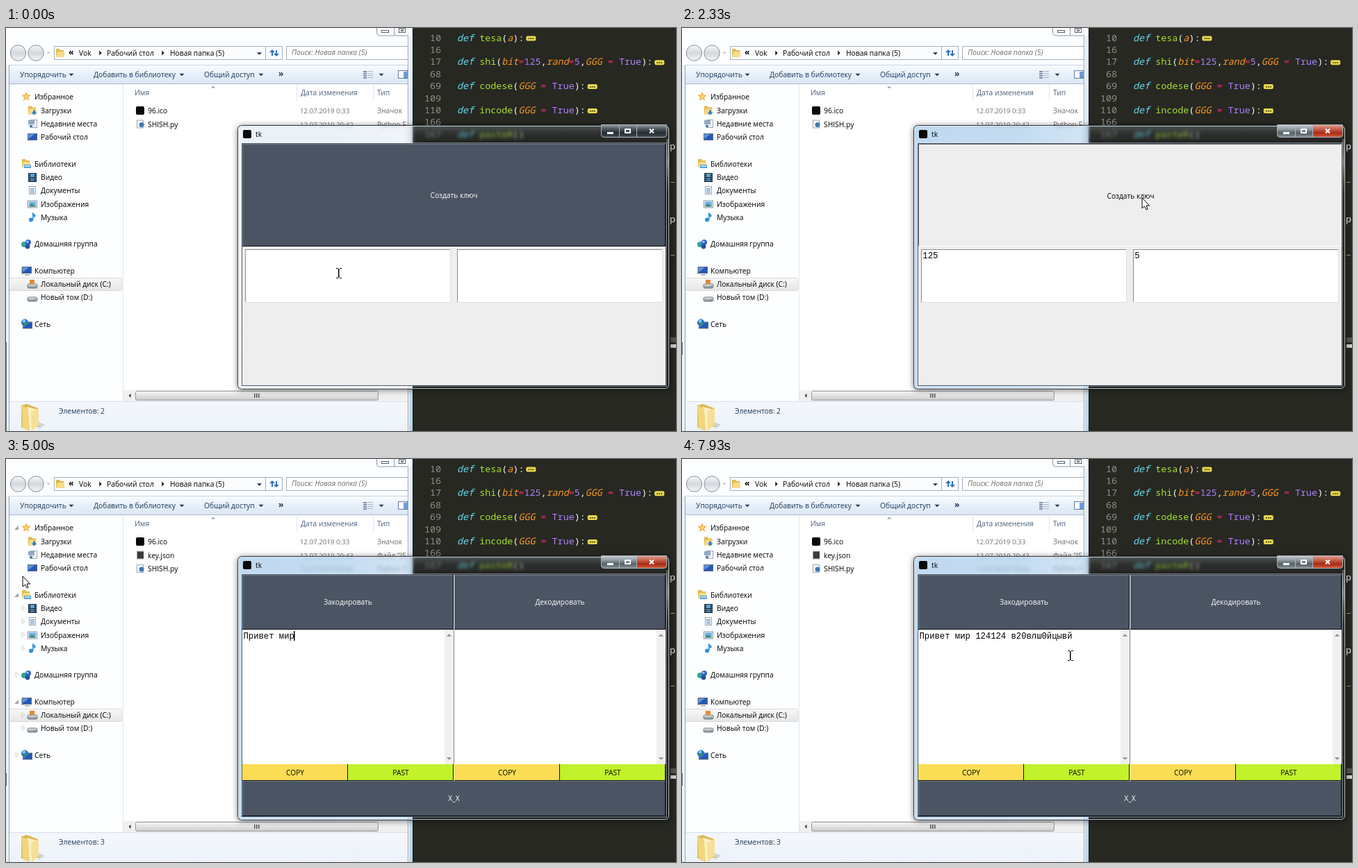
An HTML page with a canvas for the animation above (8 s loop, 964x581 px).

```html
<!DOCTYPE html>
<html lang="ru">
<head>
<meta charset="utf-8">
<style>
html, body { margin: 0; width: 100%; height: 100%; overflow: hidden; background: #272822; }
canvas { display: block; }
</style>
</head>
<body>
<canvas id="stage" width="964" height="581"></canvas>
<script>
const canvas = document.getElementById('stage');
const g = canvas.getContext('2d');
const LOOP = 8000;
const UI = '"Open Sans", "Noto Sans", sans-serif';
const MONO = '"Liberation Mono", monospace';
const CODE = '"Noto Sans Mono", "DejaVu Sans Mono", monospace';
const NAVY = '#1e395b', SLATE = '#4b5463';

// ---------- helpers ----------
function box(color, x, y, w, h) { g.fillStyle = color; g.fillRect(x, y, w, h); }
function frame(color, x, y, w, h) { g.strokeStyle = color; g.lineWidth = 1; g.strokeRect(x + .5, y + .5, w - 1, h - 1); }
function text(s, x, y, color = '#000', font = '10.3px ' + UI, align = 'left') {
  g.font = font; g.fillStyle = color; g.textAlign = align; g.fillText(s, x, y);
}
function poly(color, ...p) {
  g.beginPath();
  for (let i = 0; i < p.length; i += 2) g.lineTo(p[i], p[i + 1]);
  g.closePath(); g.fillStyle = color; g.fill();
}
function disc(color, x, y, r) { g.beginPath(); g.arc(x, y, r, 0, 7); g.fillStyle = color; g.fill(); }
function round(x, y, w, h, r) { g.beginPath(); g.roundRect(x, y, w, h, r); }
function shade(y0, y1, ...colors) {
  const s = g.createLinearGradient(0, y0, 0, y1);
  colors.forEach((c, i) => s.addColorStop(i / (colors.length - 1), c));
  return s;
}
function down(x, y, color = NAVY, r = 3.5) { poly(color, x - r, y - r / 2, x + r, y - r / 2, x, y + r / 2); }
function up(x, y, color, r = 3.5) { poly(color, x - r, y + r / 2, x + r, y + r / 2, x, y - r / 2); }
function right(x, y, color, r = 3.5) { poly(color, x - r / 2, y - r, x - r / 2, y + r, x + r / 2, y); }

// ---------- icons, centred on x, y ----------
function page(x, y) { box('#fdfdfd', x - 4, y - 6, 9, 12); frame('#9aa4b0', x - 5, y - 6, 10, 12); }
function folder(x, y) {
  poly('#e3b94f', x - 6, y - 6, x - 1, y - 6, x, y - 4, x + 5, y - 4, x + 5, y + 6, x - 6, y + 6);
  poly('#f8dd86', x - 4, y - 2, x + 6, y - 2, x + 6, y + 6, x - 6, y + 6);
}
function screen(x, y) {
  box('#5b6b80', x - 7, y - 5, 14, 10); box('#2458b8', x - 6, y - 4, 12, 8); poly('#5f94e0', x - 6, y - 4, x + 3, y - 4, x - 6, y + 3);
}
function drive(x, y) {
  round(x - 7, y - 1, 14, 6, 2); g.fillStyle = shade(y - 1, y + 5, '#eceff1', '#7d858c'); g.fill();
  g.strokeStyle = '#737b82'; g.stroke(); box('#38b24a', x + 3, y + 2, 2, 1);
}
function globe(x, y) { disc('#2a6fc4', x, y, 5); disc('#7cc7ee', x - 1, y - 2, 2.4); disc('#3a9a54', x + 1, y + 2, 2); }
const icon = {
  star(x, y) {
    const p = [];
    for (let i = 0; i < 10; i++) {
      const a = i * Math.PI / 5, r = i % 2 ? 3 : 7;
      p.push(x + r * Math.sin(a), y - r * Math.cos(a));
    }
    poly('#f0a83c', ...p); disc('#fbd96b', x, y, 2.6);
  },
  load(x, y) { folder(x, y); box('#2a7fd8', x + 1, y, 3, 4); down(x + 2.5, y + 5, '#2a7fd8', 4); },
  recent(x, y) { page(x + 2, y); box('#8fa9c4', x - 6, y - 5, 9, 6); box('#c9d8e6', x, y + 2, 5, 1); box('#4f7daa', x - 4, y + 2, 4, 3); },
  desk: screen,
  libs(x, y) { folder(x, y - 1); box('#5aa0dd', x - 3, y + 1, 10, 5); box('#b7dbf5', x - 2, y + 2, 8, 2); },
  video(x, y) {
    box('#1d2d3a', x - 6, y - 6, 12, 13); box('#59a5d8', x - 3, y - 5, 6, 5); box('#3f79a8', x - 3, y + 1, 6, 5);
    for (let i = -5; i < 7; i += 3) { box('#dfe8ee', x - 5, y + i, 1, 1); box('#dfe8ee', x + 4, y + i, 1, 1); }
  },
  doc(x, y) { page(x, y); for (let i = -3; i < 5; i += 2) box('#5b8fc4', x - 3, y + i, 6, 1); },
  image(x, y) { box('#f5f8fa', x - 7, y - 5, 14, 11); frame('#8796a4', x - 7, y - 5, 14, 11); box('#64b1ea', x - 5, y - 3, 10, 7); poly('#3a8a66', x - 5, y + 4, x - 1, y, x + 5, y + 4); },
  music(x, y) { disc('#2f8fd8', x - 2, y + 4, 3); box('#2f8fd8', x, y - 6, 1.6, 10); poly('#2f8fd8', x, y - 7, x + 5, y - 2, x + 3, y + 1, x + 1, y - 3); },
  group(x, y) { disc('#2fa39a', x - 3, y + 1, 4); disc('#3a62c8', x + 3, y - 2, 4); disc('#2c4f9e', x + 2, y + 4, 3.4); disc('#a9d7f4', x + 2, y - 3, 1.6); },
  pc(x, y) { box('#b7c1cb', x - 7, y - 5, 3, 10); screen(x + 1, y - 1); box('#9aa6b2', x - 2, y + 5, 7, 1.5); },
  disk(x, y) { drive(x, y + 1); box('#e08a38', x - 4, y - 6, 7, 6); },
  vol: (x, y) => drive(x, y + 1),
  net(x, y) { screen(x + 2, y + 2); globe(x - 2, y - 2); }
};

// ---------- file manager ----------
const tree = [
  [0, 99, 'star', 'Избранное'], [1, 118.5, 'load', 'Загрузки'], [1, 138, 'recent', 'Недавние места'],
  [1, 157, 'desk', 'Рабочий стол'], [0, 196, 'libs', 'Библиотеки'], [1, 215, 'video', 'Видео'],
  [1, 234, 'doc', 'Документы'], [1, 253.5, 'image', 'Изображения'], [1, 272.5, 'music', 'Музыка'],
  [0, 311, 'group', 'Домашняя группа'], [0, 350, 'pc', 'Компьютер'], [1, 369, 'disk', 'Локальный диск (C:)'],
  [1, 388, 'vol', 'Новый том (D:)'], [0, 426.5, 'net', 'Сеть']
];

function expander(deep, y, kind) {
  if (!deep && kind !== 'group' && kind !== 'net') return poly('#7c7c7c', 18, y - 3, 18, y + 3, 12, y + 3);
  const x = deep ? 25 : 16;
  g.beginPath(); g.moveTo(x - 2, y - 3.5); g.lineTo(x + 2, y); g.lineTo(x - 2, y + 3.5); g.closePath();
  g.strokeStyle = '#c0c0c0'; g.stroke();
}

function navTree(alpha) {
  round(4.5, 360.5, 162, 18, 2);
  g.fillStyle = shade(360, 378, '#f9f9f9', '#e6e6e6'); g.fill(); g.strokeStyle = '#d8d8d8'; g.stroke();
  for (const [deep, y, kind, label] of tree) {
    icon[kind](deep ? 38 : 29, y);
    text(label, deep ? 50 : 41, y + 4);
    const link = deep && y < 180;
    g.globalAlpha = link ? 0 : alpha;
    expander(deep, y, kind);
    g.globalAlpha = 1;
  }
}

function fileRow(y, kind, name, date, type) {
  if (kind === 'app') { round(187, y - 6, 12, 12, 2); g.fillStyle = '#0a0a0a'; g.fill(); }
  else {
    page(193, y);
    if (kind === 'py') disc('#3c78b4', 195, y + 1, 3.5); else box('#3b3a33', 189, y - 5, 9, 10);
  }
  text(name, 204, y + 4);
  text(date, 423, y + 4, '#6d6d6d', '9.7px ' + UI);
  text(type, 534, y + 4, '#6d6d6d');
}

function explorer(t) {
  box('#eaf3fa', 0, 0, 585, 581);
  box('#fdfeff', 0, 0, 578, 54);
  box(shade(0, 581, '#e6f1f9', '#cfe1ef', '#bcd6ea'), 579, 0, 6, 581);
  box('#fff', 579, 12, 1, 569);
  box('#5d6b77', 0, 453, 1, t < 1800 ? 128 : 18);

  // caption buttons
  round(533.5, -5, 60, 16, 4); g.strokeStyle = '#8b9aa8'; g.lineWidth = 1; g.stroke();
  box('#fbfdff', 579, 0, 5, 12); box('#8b9aa8', 558, 0, 1, 11);
  frame('#56616c', 540, 3, 11, 4); frame('#56616c', 565, 0, 10, 7); frame('#56616c', 568, 2, 4, 3);

  // history buttons
  for (const x of [17.5, 43]) {
    disc(shade(24, 48, '#fafbfc', '#d3d8dd', '#f6f8f9'), x, 36, 11);
    g.strokeStyle = '#828c95'; g.lineWidth = 1; g.beginPath(); g.arc(x, 36, 11.2, 0, 7); g.stroke();
  }
  down(61, 36, '#c2c8ce', 3);

  // address and search
  box('#fbfcfd', 69, 26, 329, 20); frame('#a3b0bd', 69, 26, 305, 20); frame('#a3b0bd', 373, 26, 25, 20);
  box('#fff', 403, 26, 175, 20); box('#a3b0bd', 403, 26, 175, 1); box('#a3b0bd', 403, 45, 175, 1); box('#a3b0bd', 403, 26, 1, 20);
  folder(78, 36);
  text('«', 90, 39, '#000', 'bold 12px ' + UI);
  text('Vok', 105, 40); text('Рабочий стол', 145, 40); text('Новая папка (5)', 236, 40);
  right(136, 36, '#222'); right(226, 36, '#222'); down(364.5, 37, '#26304d');
  box('#2f6fc0', 382, 33, 2, 7); up(383, 33, '#2f6fc0', 4);
  box('#2f6fc0', 388, 32, 2, 7); down(389, 39, '#2f6fc0', 4);
  text('Поиск: Новая папка (5)', 411, 39, '#6d6d6d', 'italic 10.3px ' + UI);

  // toolbar
  box(shade(54, 80, '#fafcff', '#e6eff9', '#dce7f4'), 4, 54, 574, 27);
  box('#c5d3e3', 4, 53, 574, 1); box('#a9bbd0', 4, 80, 574, 1);
  text('Упорядочить', 20, 71, NAVY); text('Добавить в библиотеку', 126, 71, NAVY); text('Общий доступ', 285, 71, NAVY);
  text('»', 392, 70, NAVY, 'bold 12px ' + UI);
  for (const x of [94, 253, 367, 540]) down(x, 67.5);
  for (let i = 0; i < 4; i++) { box('#7c8ea6', 514, 62 + i * 3, 5, 2); box('#a8b6c8', 520, 62 + i * 3, 8, 1); }
  box('#fff', 564, 61, 14, 12); frame('#5f7da3', 564, 61, 14, 12); box('#6a9bd8', 572, 63, 6, 9);

  // panes
  box('#fff', 4, 81, 574, 458); box('#fcfeff', 4, 81, 164, 458); box('#dbe7f3', 168, 81, 1, 458);
  text('Имя', 185, 97, '#4c607a'); text('Дата изменения', 424, 97, '#4c607a'); text('Тип', 534, 97, '#4c607a');
  box('#dfe7f0', 418, 82, 1, 23); box('#dfe7f0', 528, 82, 1, 23); up(298, 85, '#8ba0b8', 3);
  navTree(treeAlpha(t));
  const saved = t >= 3330;
  fileRow(119, 'app', '96.ico', '12.07.2019 0:33', 'Значок');
  if (saved) fileRow(138.5, 'json', 'key.json', '12.07.2019 20:43', 'Файл "JS');
  fileRow(saved ? 158 : 138.5, 'py', 'SHISH.py', '12.07.2019 20:42', 'Python F');

  // scrollbar
  box('#f0f0f0', 169, 522, 409, 16);
  g.save(); g.translate(178, 530); g.scale(-1, 1); right(0, 0, '#333', 3); g.restore();
  round(186.5, 523.5, 349, 13, 2); g.fillStyle = shade(523, 537, '#f6f6f6', '#e2e2e2', '#c9c9c9'); g.fill();
  g.strokeStyle = '#979797'; g.stroke();
  for (let i = 0; i < 3; i++) box('#555', 357 + i * 3, 527, 1.5, 6);

  // details
  box(shade(539, 581, '#f3f7fc', '#edf3fa'), 4, 539, 574, 42); box('#d5dfea', 4, 538, 574, 1);
  text('Элементов: ' + (saved ? 3 : 2), 76, 556, NAVY);
  poly('#dcb956', 22, 544, 30, 542, 46, 548, 47, 575, 22, 576);
  poly('#fbf0c4', 30, 546, 44, 550, 44, 574, 32, 578);
  poly('#f2d57c', 22, 544, 32, 549, 34, 581, 24, 577);
  poly('#f6df97', 36, 553, 47, 548, 47, 572, 37, 581);
  poly('rgba(150,150,140,.35)', 47, 568, 56, 572, 47, 578);
  box('#93a4b5', 4, 54, 1, 527); box('#93a4b5', 578, 12, 1, 569);
}

// ---------- code editor ----------
function codeLine(line, y, src) {
  text(line, 626, y, '#8f908a', '13.4px ' + CODE, 'right');
  if (!src) return;
  let x = 649;
  src.match(/\d+|\w+|=|[^\w=]+/g).forEach((tok, i) => {
    const arg = /^[a-z]\w*$/i.test(tok) && tok !== 'True' && i !== 2;
    const color = i === 0 ? '#66d9ef' : i === 2 ? '#a6e22e' : tok === '=' ? '#f92672'
      : /^(\d+|True)$/.test(tok) ? '#ae81ff' : arg ? '#fd971f' : '#f8f8f2';
    text(tok, x, y, color, (arg ? 'italic ' : '') + '13.4px ' + CODE);
    x += g.measureText(tok).width;
  });
  if (!src.endsWith(':')) return;
  round(x + 3, y - 7, 14, 7, 2); g.fillStyle = '#e8d84a'; g.fill();
  for (let i = 0; i < 3; i++) box('#3a3820', x + 6 + i * 3, y - 4, 2, 1.5);
}

function editor() {
  box('#272822', 585, 0, 379, 581);
  box('#15181a', 585, 0, 1, 581);
  const lines = [[10, 'def tesa(a):'], [16], [17, 'def shi(bit=125,rand=5,GGG = True):'], [68],
    [69, 'def codese(GGG = True):'], [109], [110, 'def incode(GGG = True):'], [166], [167, 'def pasteR()']];
  lines.forEach(([n, src], i) => codeLine(n, 18.5 + i * 17.4, src));
  for (const y of [175, 280]) text('p', 955, y, '#f8f8f2', '13.4px ' + CODE);
  for (const y of [222, 327]) box('#a89f5c', 956, y, 6, 1);
  box('#55564f', 956, 446, 8, 7); box('#d0d0cc', 956, 456, 8, 5);
}

// ---------- key window ----------
function windowFrame(active) {
  g.save();
  g.shadowColor = 'rgba(0,0,0,.5)'; g.shadowBlur = 8; g.shadowOffsetY = 1;
  g.beginPath(); g.rect(0, 0, 964, 581); g.roundRect(333, 140, 622, 381, 6); g.clip('evenodd');
  round(333, 140, 622, 381, 6); g.fillStyle = '#000'; g.fill();
  g.restore();

  g.save();
  round(333, 140, 622, 381, 6); g.clip();
  g.filter = 'blur(2px)';
  g.drawImage(canvas, 333, 132, 622, 40, 333, 132, 622, 40);
  g.filter = 'none';
  const rgb = active ? [168, 203, 234] : [226, 235, 244];
  const tint = g.createLinearGradient(333, 0, 585, 0);
  tint.addColorStop(0, `rgba(${rgb},.72)`);
  tint.addColorStop(.6, `rgba(${rgb},.68)`);
  tint.addColorStop(1, `rgba(${rgb},.5)`);
  box(tint, 333, 140, 252, 381);
  box(shade(140, 167, 'rgba(150,165,175,.4)', 'rgba(60,70,78,.2)', 'rgba(10,14,16,.35)'), 585, 140, 370, 27);
  box('rgba(12,16,18,.5)', 585, 167, 370, 354);
  box(shade(140, 250, 'rgba(255,255,255,.1)', 'rgba(230,240,245,.45)', 'rgba(40,50,50,.1)'), 950, 160, 4, 120);
  g.restore();

  g.lineWidth = 1;
  round(333.5, 140.5, 621, 380, 6); g.strokeStyle = '#2a333b'; g.stroke();
  round(334.5, 141.5, 619, 378, 5); g.strokeStyle = 'rgba(255,255,255,.65)'; g.stroke();
  frame('rgba(255,255,255,.4)', 338, 165, 613, 352);
  frame('rgba(60,75,90,.9)', 339, 166, 611, 350);

  round(341, 147, 12, 12, 2); g.fillStyle = '#0a0a0a'; g.fill();
  text('tk', 359, 157);

  // caption buttons
  const glass = active ? ['#c5ccd1', '#929ca3', '#566067', '#828d94'] : ['#8d979d', '#4c565c', '#262d31', '#434b50'];
  g.save();
  round(856, 139, 95, 18, [0, 0, 4, 4]); g.clip();
  box(shade(140, 157, ...glass), 856, 140, 95, 18);
  if (active) box(shade(140, 157, '#dfa190', '#c8614d', '#a92a15', '#cf5b38'), 908, 140, 43, 18);
  g.restore();
  round(856.5, 139.5, 94, 18, [0, 0, 4, 4]); g.strokeStyle = '#aab4ba'; g.stroke();
  box('#aab4ba', 882, 140, 1, 17); box('#aab4ba', 907, 140, 1, 17);
  box('#fff', 865, 150, 9, 3);
  g.lineWidth = 2; g.strokeStyle = '#fff'; g.strokeRect(891, 146, 7, 5);
  g.beginPath(); g.moveTo(926, 145.5); g.lineTo(932, 151.5); g.moveTo(932, 145.5); g.lineTo(926, 151.5); g.stroke();
}

function button(label, x, y, w, h, fill = SLATE, color = '#fff', sunk = false) {
  const lit = sunk ? '#696969' : fill === SLATE ? '#747c89' : fill, dark = sunk ? '#fff' : '#0c0d0f';
  box(fill, x, y, w, h);
  box(lit, x, y, w, 1); box(lit, x, y, 1, h);
  box(dark, x, y + h - 1, w, 1); box(dark, x + w - 1, y, 1, h);
  const d = sunk ? 1 : 0;
  text(label, x + w / 2 + d, y + h / 2 + 3.7 + d, color, '10.2px ' + UI, 'center');
}

function field(x, s, caret) {
  box('#fff', x, 319, 296, 77);
  box('#8c8c8c', x, 319, 296, 1); box('#8c8c8c', x, 319, 1, 77);
  box('#e0e0e0', x, 395, 296, 1); box('#e0e0e0', x + 295, 319, 1, 77);
  typed(s, x + 2.3, 332, caret);
}

function typed(s, x, y, caret) {
  text(s, x, y, '#000', '12.22px ' + MONO);
  if (caret) box('#000', Math.round(x + s.length * 7.333 - .5), y - 11, 1.5, 14);
}

function keyForm(t, blink) {
  const pressed = t >= 2260;
  button('Создать ключ', 340, 167, 609, 148, pressed ? '#eeeeee' : SLATE, pressed ? '#000' : '#fff', pressed);
  field(344, '125'.slice(0, count([800, 1130, 1390], t)), blink && t >= 130 && t < 1800);
  field(649, t >= 2000 ? '5' : '', blink && t >= 1800 && !pressed);
}

function pane(x, title) {
  button(title, x, 167, 304, 79);
  box('#fff', x, 246, 291, 194); box('#f0f0f0', x + 291, 246, 13, 194);
  up(x + 297.5, 254, '#8a8a8a'); down(x + 297.5, 432, '#8a8a8a');
  button('COPY', x, 440, 152, 24, '#fbdd55', '#000');
  button('PAST', x + 152, 440, 152, 24, '#c1f22b', '#000');
}

const message = 'Привет мир 124124 в20влш0йцывй';
const keys = [3400, 3600, 3800, 3800, 4000, 4070, 4270, 4400, 4470, 4600, 5730, 5930, 6060, 6130, 6200, 6200, 6270, 6330];
for (let i = 0; i < 8; i++) keys.push(6670 + i * 75);
for (let i = 0; i < 4; i++) keys.push(7730 + i * 66);

function cipherForm(t, blink) {
  pane(340, 'Закодировать'); pane(645, 'Декодировать');
  box('#8a8a8a', 644, 246, 1, 194);
  typed(message.slice(0, count(keys, t)), 341.5, 259, blink && t >= 2660);
  button('X_X', 340, 464, 609, 51);
}

// ---------- timing ----------
const count = (times, t) => times.filter(k => k <= t + 5).length;
const clamp = v => Math.max(0, Math.min(1, v));
const treeAlpha = t => t < 5500 ? clamp((t - 4860) / 200) : clamp((5960 - t) / 290);

const path = [[0, 479, 353], [340, 479, 353], [800, 565, 368], [1200, 692, 363], [1267, 700, 357], [1530, 729, 355],
  [1870, 729, 355], [2240, 662, 245], [2400, 662, 245], [2600, 488, 291], [4790, 488, 291], [5000, 24, 169],
  [5270, 75, 60], [5670, 559, 283], [8000, 559, 283]];

function mouseAt(t) {
  const i = path.findIndex(p => p[0] > t), [t0, x0, y0] = path[i - 1], [t1, x1, y1] = path[i];
  const k = (t - t0) / (t1 - t0);
  return [Math.round(x0 + (x1 - x0) * k), Math.round(y0 + (y1 - y0) * k)];
}

function pointer(x, y, beam) {
  if (beam) {
    box('#000', x - 1, y - 6, 1.5, 13);
    for (const d of [-7, 7]) { box('#000', x - 4, y + d, 3, 1); box('#000', x + 1, y + d, 3, 1); }
    return;
  }
  poly('#fff', x, y, x, y + 15, x + 3.5, y + 12, x + 6, y + 17, x + 8, y + 16, x + 6, y + 11, x + 10.5, y + 11);
  g.strokeStyle = '#000'; g.lineWidth = 1; g.stroke();
}

function draw(now) {
  const t = Math.floor((now % LOOP + 5) * .015) / .015 % LOOP;
  const blink = (t + 32) % 900 < 600, cipher = t >= 2460;
  explorer(t);
  editor();
  windowFrame(t >= 130);
  box('#eeeeee', 340, 167, 609, 348);
  (cipher ? cipherForm : keyForm)(t, blink);
  const [x, y] = mouseAt(t);
  const beam = x > 340 && x < 945 && (cipher ? y > 246 && y < 440 : y > 319 && y < 395);
  pointer(x, y, beam);
}

function tick() { draw(performance.now()); requestAnimationFrame(tick); }
tick();
</script>
</body>
</html>
```
